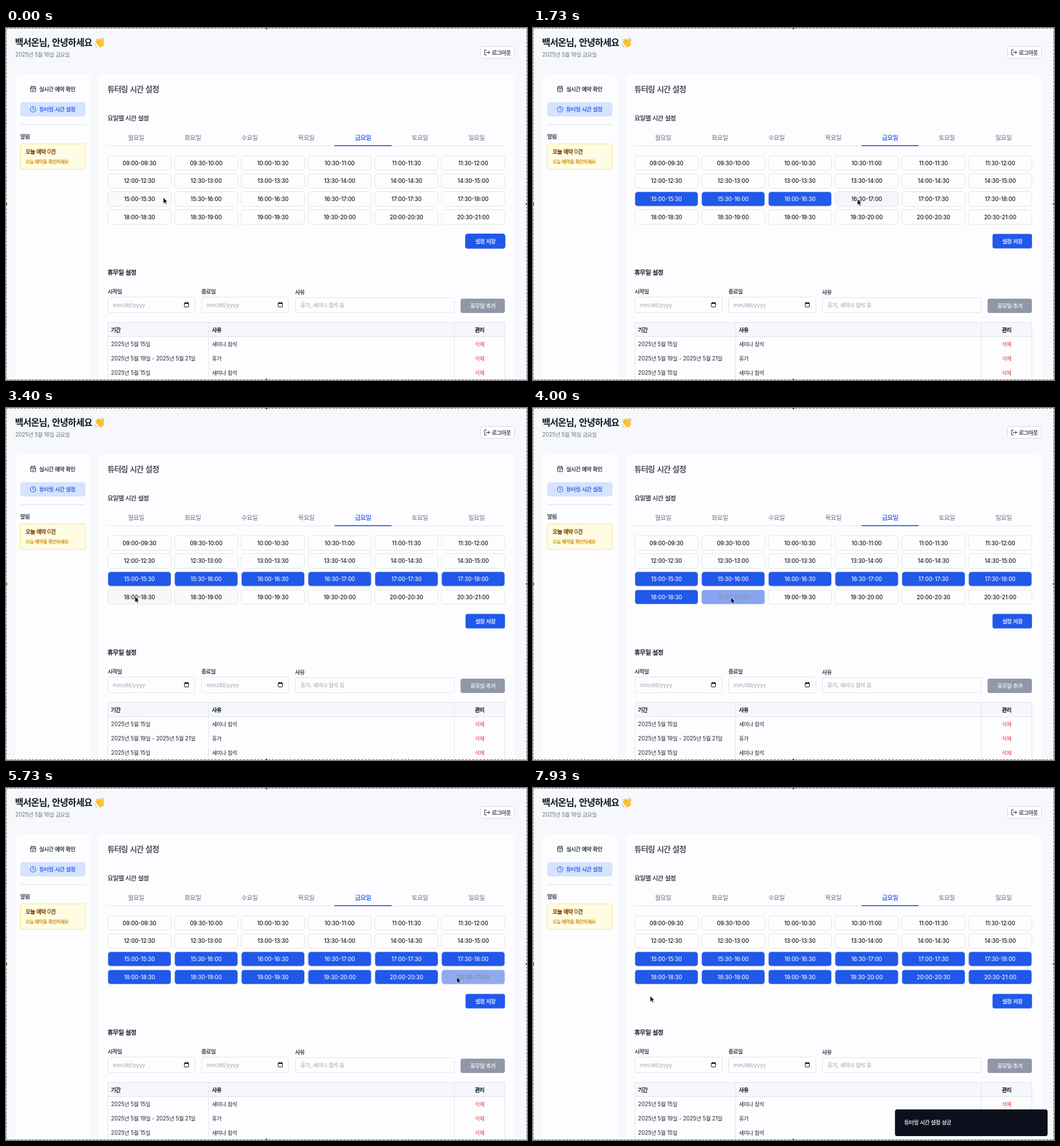
These frames come from a looping animation (800 by 541 pixels, 8 s). An HTML page:

```html
<!DOCTYPE html>
<html lang="ko">
<head>
<meta charset="utf-8">
<style>
html, body { margin: 0; width: 100%; height: 100%; overflow: hidden; background: #f6f8fb; }
svg { display: block; width: 800px; height: 541px; }
text { font-family: Inter, "Noto Sans CJK KR", "Noto Sans CJK", sans-serif; white-space: pre; }
.k { letter-spacing: -.055em; }
</style>
</head>
<body>
<svg id="stage" viewBox="0 0 800 541"></svg>
<script>
const LOOP = 8000;
const BLUE = '#2058ea', INK = '#1f2430', LINE = '#e3e6eb';
const stage = document.getElementById('stage');

// Markup helpers
const rect = (x, y, w, h, fill, r = 0, stroke = 'none', extra = '') =>
  `<rect x="${x}" y="${y}" width="${w}" height="${h}" rx="${r}" fill="${fill}" stroke="${stroke}" ${extra}/>`;
// Hangul has only regular and bold cuts, so a thin stroke gives the weights between
const text = (s, x, y, size = 8.4, fill = INK, weight = 400, anchor = 'start') => {
  const outline = weight > 400 && weight < 700 ? `font-weight="400" stroke="${fill}" stroke-width="${(weight - 400) / 450}"` : '';
  return `<text x="${x}" y="${y}" font-size="${size}" fill="${fill}" font-weight="${weight}" text-anchor="${anchor}">` +
    s.replace(/[가-힣]+/g, `<tspan class="k" ${outline}>$&</tspan>`) + '</text>';
};
const mid = (s, x, y, size, fill, weight) => text(s, x, y, size, fill, weight, 'middle');
const path = (d, stroke, width = 1, extra = '') =>
  `<path d="${d}" fill="none" stroke="${stroke}" stroke-width="${width}" ${extra}/>`;
const round = 'stroke-linecap="round" stroke-linejoin="round"';

function header() {
  const skin = '#fcc231';
  return text('백서온님, 안녕하세요', 13.8, 27.4, 14.2, '#111827', 700) +
    `<g transform="translate(-.8 0)"><g transform="translate(145 23) rotate(-38)">` +
    path('M-3.4 0V-4.6M-1.1 -1V-6.6M1.2 -1V-6.2M3.4 0V-4.4M3.6 3L6 -.6', skin, 2.2, round) +
    rect(-4.6, -2, 9.2, 8.6, skin, 3.6) +
    path('M-2.2 -1.4V-4M.1 -1.4V-4.8M2.3 -1.2V-4', '#e39a1c', .6, round) + '</g>' +
    path('M147 16.2q3 .6 3.8 3.6M148.6 15q2.4 .9 3 3.4M137.6 25.4q.4 3 3 4', '#7f9db4', .7, round) + '</g>' +
    text('2025년 5월 16일 금요일', 14.3, 43.7, 8.25, '#6b7280') +
    rect(728.5, 28.5, 52, 18, '#fff', 3, '#d9dce3') +
    path('M737.5 33.8h-2.6v7.6h2.6M737.5 37.6h5M740.6 35.5l2.1 2.1l-2.1 2.1', INK, .9, round) +
    text('로그아웃', 746, 40.6, 8.4, INK, 500);
}

function sidebar() {
  return rect(14.5, 71, 115.5, 490, '#fdfdff', 6) +
    rect(37.7, 90.2, 7.8, 7.6, 'none', 1, INK, 'stroke-width=".9"') +
    path('M37.7 92.7h7.8M39.8 89v2M43.4 89v2M40 95l1.2 1.1l2.1 -2.1', INK, .9, round) +
    text('실시간 예약 확인', 51, 96.8, 8.4, INK, 500) +
    rect(22, 114, 100, 22, '#d5e4fc', 4) +
    `<circle cx="41.6" cy="125" r="4.1" fill="none" stroke="${BLUE}" stroke-width=".9"/>` +
    path('M41.6 122.4V125l1.7 .9', BLUE, .9, round) +
    text('튜터링 시간 설정', 51, 128.3, 8.4, BLUE, 500) +
    path('M22 148.5H122', LINE) +
    text('알림', 21.8, 169.8, 8.4, INK, 500) +
    rect(22, 178, 100, 39.3, '#fefce2', 3, '#fbe68c') +
    text('오늘 예약 0건', 30, 193.4, 8.4, '#854d0e', 600) +
    text('오늘 예약을 확인하세요', 30, 207.6, 7.2, '#cb8a0a', 500);
}

function schedule() {
  const days = [...'월화수목금토일'].map((d, i) =>
    mid(d + '요일', 199.6 + i * 87.15, 171.5, 9.6, i === 4 ? BLUE : '#6b7280', i === 4 ? 500 : 400));
  return rect(142, 71, 639, 490, '#fdfdff', 6) +
    text('튜터링 시간 설정', 155.8, 98.5, 12, INK, 500) +
    text('요일별 시간 설정', 155.8, 142.2, 9.6, INK, 500) +
    days.join('') +
    path('M156 181H766', LINE) + path('M504.5 180.8H592', BLUE, 1.4);
}

const dateField = (label, x) =>
  text(label, x, 407.8, 8.4, INK, 500) +
  rect(x + .5, 413.5, 134, 24, '#fdfdff', 3, LINE) +
  text('mm/dd/yyyy', x + 8, 428.8, 8.4, '#a0a4ad') +
  rect(x + 118, 422.4, 6.4, 6.4, 'none', .6, '#111', 'stroke-width=".9"') +
  path(`M${x + 118} 423.4h6.4M${x + 119.6} 421v1.4M${x + 122.8} 421v1.4`, '#111', 1.2);

function holidays() {
  const rows = [['2025년 5월 15일', '세미나 참석'], ['2025년 5월 19일 - 2025년 5월 21일', '휴가'], ['2025년 5월 15일', '세미나 참석']];
  return text('휴무일 설정', 155.8, 378.6, 9.6, INK, 600) +
    dateField('시작일', 156) + dateField('종료일', 300) +
    text('사유', 444, 408.8, 8.4, INK, 500) +
    rect(444.5, 414.5, 244, 23, '#fdfdff', 3, LINE) +
    text('휴가, 세미나 참석 등', 452, 429.2, 8.4, '#a0a4ad') +
    rect(698, 416, 68, 22, '#9098a7', 3) +
    mid('휴무일 추가', 732.2, 430, 8.4, '#f8f9fc', 500) +
    rect(156.5, 452.5, 609.5, 22, '#f5f7fa') +
    path('M156 452.5H766.5M156 474.5H766.5M156.5 452V541M310.8 452V541M688.3 452V541M766 452V541', LINE) +
    text('기간', 161.3, 466.6, 8.4, INK, 600) + text('사유', 316.2, 466.6, 8.4, INK, 600) +
    mid('관리', 727.2, 466.6, 8.4, INK, 600) +
    rows.map(([when, why], i) => {
      const y = 489 + i * 21.8;
      return text(when, 161.3, y) + text(why, 316.2, y) + mid('삭제', 727.2, y, 8.4, '#e0413f');
    }).join('');
}

// Time slots
const clock = m => String(m / 60 | 0).padStart(2, '0') + ':' + String(m % 60).padStart(2, '0');
const slots = Array.from({ length: 24 }, (_, i) => ({
  x: 156.3 + i % 6 * 102.5, y: 196.2 + (i / 6 | 0) * 27.7, w: 97.2, h: 22.4,
  label: clock(540 + i * 30) + '-' + clock(570 + i * 30)
}));
const save = { x: 705.6, y: 316.6, w: 60.6, h: 22.2 };

stage.innerHTML = header() + sidebar() + schedule() +
  slots.map(s => `<g class="slot">${rect(s.x, s.y, s.w, s.h, '#fff', 4.5, LINE)}${mid(s.label, s.x + s.w / 2, s.y + 14.3, 8.4, '#111', 500)}</g>`).join('') +
  `<g id="save">${rect(save.x, save.y, save.w, save.h, BLUE, 3)}${mid('설정 저장', 736, 330.7, 8.4, '#f8faff', 500)}</g>` +
  holidays() +
  `<g id="toast">${rect(555.8, 494, 234.4, 41, '#0b101c', 3.5)}${text('튜터링 시간 설정 성공', 570, 517.4, 8.4, '#f4f6fa', 500)}</g>` +
  rect(.5, .5, 799, 540, 'none', 0, '#7d8187', 'stroke-dasharray="3.5 2"') +
  [[399, 0], [399, 539], [0, 269.5], [798, 269.5]].map(([x, y]) => rect(x, y, 2, 2, '#444')).join('') +
  '<path id="cursor" d="M0 0V9.2L2.1 7.3L3.5 10.4L5.1 9.7L3.7 6.7H6.5Z" fill="#000" stroke="#fff" stroke-width=".6"/>';

const slotEls = [...document.querySelectorAll('.slot')].map(g => g.children);
const saveBox = document.querySelector('#save rect');
const toast = document.getElementById('toast');
const cursor = document.getElementById('cursor');

// Pointer stops: time, x, y
const stops = [
  [-60, 250, 277], [0, 241.5, 260.5], [420, 241.5, 260.5], [720, 308, 263], [850, 318, 263], [1130, 389, 262], [1390, 394, 262],
  [1760, 500, 263], [1930, 510, 262], [2130, 657, 259.5], [2470, 657, 259.5], [2600, 698, 261], [2930, 698, 261],
  [3400, 198, 289.5], [3680, 198, 289.5], [3920, 300, 291], [4130, 312, 291], [4240, 312, 291], [4420, 400, 291],
  [4670, 477, 289.5], [4900, 500, 290], [5180, 600, 291], [5400, 606, 291], [5680, 692, 290.5], [5960, 694, 290.5],
  [6280, 737, 326], [7300, 737, 326], [7930, 180, 319.5], [8000, 180, 319.5]
];
const clicks = [70, 740, 1360, 1850, 2362, 2880, 3570, 3930, 4430, 4840, 5260, 5664];

const clamp = v => Math.min(1, Math.max(0, v));
const smooth = v => (v = clamp(v)) * v * (3 - 2 * v);

function pointer(t) {
  const i = Math.max(1, stops.findIndex(s => s[0] >= t));
  const [t0, x0, y0] = stops[i - 1], [t1, x1, y1] = stops[i];
  const k = smooth((t - t0) / (t1 - t0));
  return [x0 + (x1 - x0) * k, y0 + (y1 - y0) * k];
}

const rgb = h => [1, 3, 5].map(i => parseInt(h.slice(i, i + 2), 16));
const mix = (a, b, k) => a.map((v, i) => v + (b[i] - v) * k);
const css = c => `rgb(${c.map(Math.round)})`;
const [white, hoverBg, blue, blueHover, black, pale] =
  ['#fdfdff', '#f2f4f7', BLUE, '#3567ec', '#121419', '#f0f4ff'].map(rgb);

function draw(t) {
  // Hover fades over the last 150 ms of pointer positions
  const trail = Array.from({ length: 10 }, (_, k) => pointer(t - k * 15));
  const hover = b => trail.filter(([x, y]) =>
    x >= b.x && x <= b.x + b.w && y >= b.y && y <= b.y + b.h).length / trail.length;

  slots.forEach((s, i) => {
    const h = hover(s), on = i < 12 ? 0 : smooth((t - clicks[i - 12]) / 130);
    const [box, label] = slotEls[i];
    box.setAttribute('fill', css(mix(mix(white, hoverBg, h), mix(blue, blueHover, h), on)));
    label.setAttribute('fill', css(mix(black, pale, on)));
  });
  saveBox.setAttribute('fill', css(mix(blue, blueHover, hover(save))));
  // The button keeps its focus ring until the first slot is clicked
  saveBox.setAttribute('stroke', t < clicks[0] ? BLUE : 'none');

  const k = smooth((t - 6480) / 220);
  toast.setAttribute('opacity', k);
  toast.setAttribute('transform', `translate(0 ${(1 - k) * 46})`);
  cursor.setAttribute('transform', `translate(${pointer(t)})`);
}

function frame() {
  draw(performance.now() % LOOP);
  requestAnimationFrame(frame);
}
frame();
</script>
</body>
</html>
```
